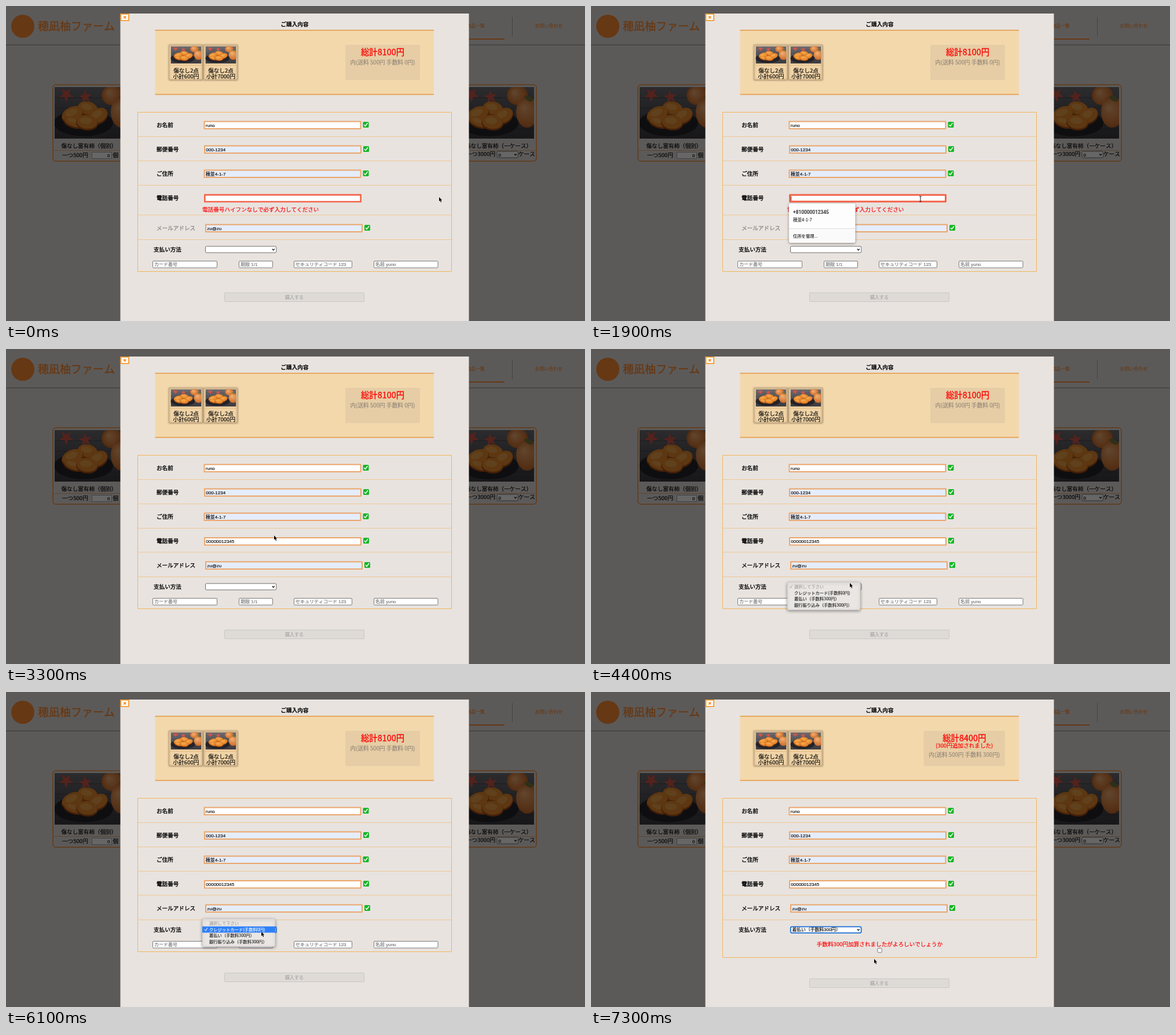
Recreate the animation shown at these times as an HTML page with a canvas. Size 1000x544 px, loop 7400 ms.

```html
<!DOCTYPE html>
<html lang="ja">
<head>
<meta charset="utf-8">
<style>
  html, body { margin: 0; width: 100%; height: 100%; overflow: hidden; background: #5d5b59; }
  canvas { display: block; width: 100vw; height: 100vh; }
</style>
</head>
<body>
<canvas id="stage"></canvas>
<script>
const W = 1000, H = 544, LOOP = 7400, STEP = 100;
const JP = '"Noto Sans CJK JP", "Noto Sans CJK", sans-serif';
const UI = '"Liberation Sans", "Noto Sans CJK JP", sans-serif';
const PAPER = '#e8e3df', ORANGE = '#f3b459', NAV = '#ff8c32';
const INPUT_ORANGE = '#eba56c', AUTOFILL = '#e5edfc';
const METHODS = ['選択して下さい', 'クレジットカード(手数料0円)', '着払い（手数料300円）', '銀行振り込み（手数料300円）'];
const ADDRESS = '穂並4-1-7';

// Moments at which the form changes state
const FOCUS = 1600, FILLED = 2600, OPEN1 = 4200, PICK1 = 5500, OPEN2 = 5900, PICK2 = 6600;
const PATH = [[0, 748, 330], [500, 748, 330], [1400, 569, 333], [2000, 569, 333],
  [2400, 400, 362], [2700, 400, 362], [3300, 463, 322], [4000, 447, 404], [4500, 447, 404],
  [5100, 445, 425], [5600, 445, 425], [5800, 441, 414], [6200, 441, 414],
  [6450, 441, 421], [6700, 441, 421], [7300, 489, 461]];

const canvas = document.getElementById('stage');
const ctx = canvas.getContext('2d');
const dpr = window.devicePixelRatio || 1;
canvas.width = W * dpr;
canvas.height = H * dpr;

function rect(x, y, w, h, color) {
  ctx.fillStyle = color;
  ctx.fillRect(x, y, w, h);
}

// A box given by its outer edges, with the border drawn inside
function box(x, y, x2, y2, fill, border, line = 1, radius = 0) {
  ctx.beginPath();
  ctx.roundRect(x + line / 2, y + line / 2, x2 - x - line, y2 - y - line, radius);
  if (fill) { ctx.fillStyle = fill; ctx.fill(); }
  if (border) { ctx.strokeStyle = border; ctx.lineWidth = line; ctx.stroke(); }
}

// y is the middle of the line of text; a hairline outline gives a medium weight
function text(str, x, y, { size = 9.6, color = '#080808', font = JP, weight = 400, align = 'left', outline = 0.02 } = {}) {
  ctx.font = `${weight} ${size}px ${font}`;
  ctx.fillStyle = ctx.strokeStyle = color;
  ctx.textAlign = align;
  ctx.lineWidth = size * outline;
  ctx.lineJoin = 'round';
  ctx.fillText(str, x, y + size * 0.37);
  ctx.strokeText(str, x, y + size * 0.37);
}

function shape(points, fill, stroke, line = 1) {
  ctx.beginPath();
  points.forEach(([x, y]) => ctx.lineTo(x, y));
  ctx.closePath();
  if (stroke) { ctx.strokeStyle = stroke; ctx.lineWidth = line; ctx.stroke(); }
  ctx.fillStyle = fill;
  ctx.fill();
}

function stroke(points, color, line) {
  ctx.beginPath();
  points.forEach(([x, y]) => ctx.lineTo(x, y));
  ctx.strokeStyle = color;
  ctx.lineWidth = line;
  ctx.stroke();
}

function oval(x, y, rx, ry, fill, turn = 0) {
  ctx.beginPath();
  ctx.ellipse(x, y, rx, ry, turn, 0, Math.PI * 2);
  ctx.fillStyle = fill;
  ctx.fill();
}

function shadowed(color, blur, dy, draw) {
  ctx.save();
  ctx.shadowColor = color;
  ctx.shadowBlur = blur * dpr;
  ctx.shadowOffsetY = dy * dpr;
  draw();
  ctx.restore();
}

function leaf(x, y, r, turn) {
  const points = [];
  for (let i = 0; i < 10; i++) {
    const a = turn + i * Math.PI / 5, d = i % 2 ? r * 0.4 : r;
    points.push([x + d * Math.cos(a), y + d * Math.sin(a)]);
  }
  shape(points, '#d0564a');
}

function fruit(x, y, rx, ry) {
  const g = ctx.createRadialGradient(x - rx * 0.3, y - ry * 0.3, 1, x, y, Math.max(rx, ry));
  g.addColorStop(0, '#f2ae72');
  g.addColorStop(1, '#cc6a26');
  oval(x, y, rx, ry, g);
}

// Fruit still life, laid out on a 128 × 89 grid
function photo(x, y, w, h) {
  ctx.save();
  ctx.beginPath();
  ctx.rect(x, y, w, h);
  ctx.clip();
  ctx.translate(x, y);
  ctx.scale(w / 128, h / 89);
  const back = ctx.createLinearGradient(0, 0, 0, 89);
  back.addColorStop(0, '#6d6b70');
  back.addColorStop(0.55, '#504e54');
  back.addColorStop(1, '#3a383d');
  rect(0, 0, 128, 89, back);
  for (let i = 1; i < 5; i++) rect(0, i * 18, 128, 1, 'rgba(25,25,30,.3)');
  oval(50, 62, 51, 23, '#242329');
  leaf(20, 13, 13, 0.3);
  leaf(53, 17, 12, 0.8);
  fruit(99, 14, 18, 17);
  fruit(116, 43, 19, 27);
  oval(119, 20, 8, 4, '#77753f', 0.5);
  oval(53, 51, 32, 17, '#b55a18');
  [[57, 36, 18, 12, 0.2], [31, 46, 20, 13, -0.4], [75, 49, 18, 13, -0.5],
   [33, 60, 18, 9, 0.3], [56, 60, 19, 13, 0.1]].forEach(([cx, cy, rx, ry, turn]) => {
    oval(cx, cy + 2, rx, ry, '#aa4e13', turn);
    oval(cx, cy, rx - 1, ry - 1, '#e88a2e', turn);
    oval(cx - 2, cy - 2, rx * 0.55, ry * 0.45, '#f2a248', turn);
  });
  ctx.restore();
}

function chevron(x, y) {
  stroke([[x - 2, y - 1], [x, y + 1.2], [x + 2, y - 1]], '#222', 1.3);
}

function productCard(x, title, titleX) {
  box(x, 135, x + 137, 269, null, '#f4a460', 2, 5);
  photo(x + 4, 140, 128, 89);
  text(title, titleX, 241);
  rect(x + 2, 249, 133, 1, '#e8b27c');
}

function page() {
  rect(0, 0, W, H, PAPER);
  rect(0, 66.5, W, 1.5, '#a9a6a3');
  oval(29, 35, 20, 20, NAV);
  text('穂凪柚ファーム', 55, 35, { size: 19, color: NAV });
  text('商品一覧', 795, 34, { size: 8, color: NAV });
  text('お問い合わせ', 913.5, 34, { size: 8, color: NAV });
  rect(760, 56, 101, 2, NAV);
  rect(874, 19, 1, 33, '#a9a6a3');

  productCard(80, '傷なし富有柿（個別）', 95.5);
  text('一つ500円', 97, 257.5);
  box(148, 252, 183, 264, '#fff', '#a9a6a3');
  text('0', 179.5, 258, { size: 8, font: UI, align: 'right' });
  text('個', 184.5, 257.5);

  productCard(780, '傷なし富有柿（一ケース）', 793);
  text('一つ3000円', 795, 255.5);
  box(847.5, 250.5, 885, 262.5, '#fff', '#767676', 1, 2);
  text('0', 850.5, 257, { size: 8, font: UI });
  chevron(880, 256.5);
  text('ケース', 885, 255.5);
  rect(0, 0, W, H, 'rgba(0,0,0,.6)');
}

function thumb(x, subtotal) {
  shadowed('rgba(70,50,30,.6)', 3, 0, () => box(x, 67, x + 59, 128, '#f0d3a6', '#c9ae86'));
  photo(x + 3.5, 69.5, 53, 30);
  rect(x + 1, 102, 57, 1, '#e3b97e');
  text('傷なし2点', x + 30, 111, { align: 'center' });
  text(subtotal, x + 30, 121, { align: 'center' });
}

function summary(cod) {
  rect(257.5, 41, 481.5, 112.5, '#f3d8ac');
  rect(257.5, 41, 481.5, 1.7, '#e4a052');
  rect(257.5, 151.8, 481.5, 1.7, '#e4a052');
  thumb(281, '小計600円');
  thumb(341, '小計7000円');
  const left = cod ? 574.5 : 586, mid = (left + 715) / 2;
  box(left, 67, 715, 128, '#e6cda5', null, 0, 2);
  text(cod ? '総計8400円' : '総計8100円', mid, 80, { size: 14.4, color: '#f00', align: 'center' });
  if (cod) text('(300円追加されました)', mid, 92.5, { color: '#f00', align: 'center' });
  text(`内(送料 500円 手数料 ${cod ? 300 : 0}円)`, mid, cod ? 108 : 97.5,
    { color: '#96897a', size: 9.7, align: 'center' });
}

function field(x, y, value, fill = '#fff', border = INPUT_ORANGE, line = 2) {
  box(x, y, x + 272, y + 14.5, fill, border, line);
  text(value, x + 3.3, y + 7.3, { size: 8, font: UI });
}

function check(x, y) {
  box(x - 5, y - 5, x + 5, y + 5, '#16b626', null, 0, 1.5);
  stroke([[x - 3, y], [x - 1, y + 2.6], [x + 3, y - 3]], '#fff', 1.4);
}

function label(str, x, y, color) {
  text(str, x, y, { outline: 0.04, color });
}

function form(t, valid, cod) {
  const dy = valid ? -10 : 0, focused = t >= FOCUS && !valid;
  const bottom = valid && !cod ? 449 : 459;
  box(227, 183, 770, bottom, null, ORANGE);
  [225, 267, 309, 360.5 + dy, 403 + dy].forEach(y => rect(228, y, 541, 0.9, '#efc48a'));

  label('お名前', 260, 205);
  field(341.5, 198.5, 'runo');
  check(621.5, 205);
  label('郵便番号', 260, 247);
  field(342, 240.5, '000-1234', AUTOFILL);
  check(622, 247);
  label('ご住所', 260, 289);
  field(341.5, 282.5, ADDRESS, AUTOFILL);
  check(621.5, 289);

  label('電話番号', 260, 331);
  if (valid) {
    field(342, 325, '00000012345');
    check(622, 331);
  } else {
    field(342, 324.8, '', '#fff', '#f4634a', focused ? 3 : 2.6);
    text('電話番号ハイフンなしで必ず入力してください', 339, 351, { color: '#f00' });
    if (focused && (t - FOCUS) % 1000 < 500) rect(345.3, 328.3, 0.8, 8, '#111');
  }

  label('メールアドレス', 260, 383 + dy, valid ? '#080808' : '#918d8a');
  field(344, 376.5 + dy, 'zu@zu', AUTOFILL);
  check(624, 383 + dy);

  label('支払い方法', 255, 420 + dy);
  const picked = t > PICK2 ? METHODS[2] : t > PICK1 ? METHODS[1] : '';
  if (picked) box(343.8, 404.5, 467.6, 417, '#fff', '#1d6fd6', 1.8, 2.5);
  else box(344, 414.5 + dy, 467.3, 426.5 + dy, '#fff', '#6f6f6f', 1, 2);
  text(picked, 347.5, 420.5 + dy, { size: 7.8, font: UI });
  chevron(461.8, 420.5 + dy);

  if (cod) {
    text('手数料300円加算されましたがよろしいでしょうか', 498.5, 435.5, { color: '#f00', align: 'center' });
    box(494.5, 442, 502.8, 450.3, '#fff', '#767676', 1, 1.5);
  } else {
    [[253, 365, 'カード番号'], [402, 461, '期限 1/1'],
     [497, 598, 'セキュリティコード 123'], [635, 746.5, '名前 yuno']].forEach(([x, x2, hint]) => {
      box(x, 440 + dy, x2, 452.6 + dy, '#fff', '#7b7977', 1, 1.5);
      text(hint, x + 3, 446.2 + dy, { size: 8, font: UI, color: '#757575' });
    });
  }
  box(377, bottom + 35.7, 619, bottom + 52, '#dedbd7', '#c9c6c3', 1, 1);
  text('購入する', 498, bottom + 43.8, { size: 8, color: '#a8a5a3', align: 'center' });
}

function suggestions(hover) {
  shadowed('rgba(0,0,0,.45)', 4, 1, () => box(341.8, 341, 456.5, 409, '#fafafa', null, 0, 3));
  rect(342, 342, 114, 42, hover ? '#ececec' : '#fdfdfd');
  rect(342, 384, 114, 0.8, '#d8d8d8');
  text('+810000012345', 349, 356, { size: 8.4, font: 'Roboto, sans-serif', weight: 500, color: '#333' });
  text(ADDRESS, 349, 369, { size: 7.5, color: '#333' });
  text('住所を管理...', 349, 397.5, { size: 7.3, color: '#222' });
}

function menu(top, checked, cursorY, fading) {
  const hover = Math.floor((cursorY - top - 2) / 10.5);
  ctx.globalAlpha = fading ? 0.35 : 1;
  shadowed(`rgba(0,0,0,${fading ? 0.1 : 0.4})`, 5, 1.5, () =>
    box(338.7, top - 0.5, 465.3, top + 48, '#e9e6e3', '#cbc7c4', 0.6, 3));
  METHODS.forEach((name, i) => {
    const y = top + 7.5 + i * 10.6, lit = i > 0 && i === hover;
    if (fading) ctx.globalAlpha = lit ? 0.6 : 0.35;
    if (lit) rect(339, y - 5.3, 126, 10.8, fading ? '#4a9cf8' : '#2f80f8');
    const color = lit ? '#fff' : i ? '#222' : '#a5a2a0';
    text(name, 351, y, { size: 7.3, color });
    if (i === checked) stroke([[343, y], [344.8, y + 2.3], [348, y - 3]], color, 1);
  });
  ctx.globalAlpha = 1;
}

function cursorAt(t) {
  const i = PATH.findIndex(p => p[0] > t);
  if (i < 0) return PATH[PATH.length - 1].slice(1);
  const [t0, x0, y0] = PATH[i - 1], [t1, x1, y1] = PATH[i];
  const k = (t - t0) / (t1 - t0), e = k * k * (3 - 2 * k);
  return [x0 + (x1 - x0) * e, y0 + (y1 - y0) * e];
}

function cursor(x, y, beam) {
  ctx.save();
  ctx.translate(x, y);
  if (beam) {
    stroke([[0, -4], [0, 4.5]], '#111', 1);
    [-4.3, 4.8].forEach(v => stroke([[-2, v], [2, v]], '#111', 0.8));
  } else {
    ctx.lineJoin = 'round';
    shape([[0, 0], [0, 7.6], [1.8, 6.1], [3, 9], [4.3, 8.4], [3.1, 5.6], [5.3, 5.4]], '#000', '#fff');
  }
  ctx.restore();
}

function draw(t) {
  const valid = t >= FILLED, cod = t > PICK2;
  const [x, y] = cursorAt(t);
  ctx.setTransform(dpr, 0, 0, dpr, 0, 0);
  page();
  rect(197.5, 13, 602, H - 13, PAPER);
  box(197.5, 13, 213, 26, '#fff', '#f39a2c', 1.8);
  stroke([[203.2, 17.5], [207.2, 21.5]], '#f08a1c', 1.7);
  stroke([[207.2, 17.5], [203.2, 21.5]], '#f08a1c', 1.7);
  text('ご購入内容', 498.5, 31, { weight: 700, align: 'center', outline: 0.01 });
  summary(cod);
  form(t, valid, cod);
  if (t >= FOCUS && !valid) suggestions(y > 342);
  if (t >= OPEN1 && t <= PICK1) menu(403, 0, y, t === PICK1);
  if (t >= OPEN2 && t <= PICK2) menu(392, 1, y, t === PICK2);
  const inField = x > 342 && x < 614 && y > 325 && y < 339;
  cursor(x, y, inField);
}

function tick(now) {
  draw(Math.floor((now % LOOP) / STEP) * STEP);
  requestAnimationFrame(tick);
}
requestAnimationFrame(tick);
</script>
</body>
</html>
```
